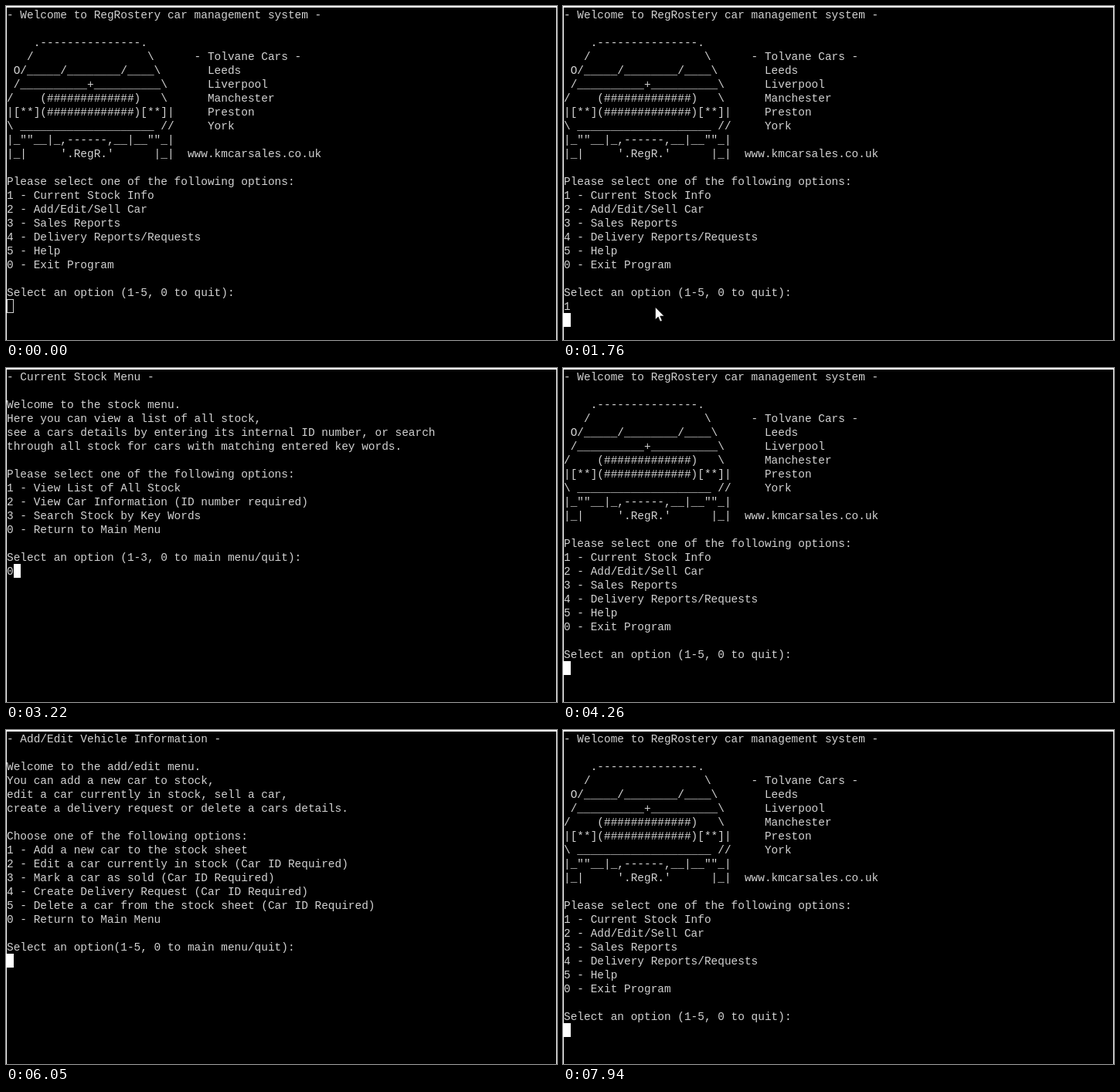
Write an HTML page that moves like this. It is 713x433 px and loops after 8 s.

```html
<!DOCTYPE html>
<html lang="en">
<head>
<meta charset="utf-8">
<title>Car stock terminal</title>
<style>
html, body { margin: 0; width: 100%; height: 100%; overflow: hidden; background: #fff; }
#term {
  position: absolute; left: 1px; top: 2px; width: 711px; height: 431px;
  overflow: hidden; background: #000; color: #d2d2d2;
  font: 14.44px/18px "Liberation Mono", "Courier New", monospace;
  font-variant-ligatures: none;
}
pre { position: absolute; left: 0; top: 1px; margin: 0; font: inherit; }
.screen, .key { visibility: hidden; animation: 8s step-end infinite; }
.key { position: absolute; left: 0; }
#main { animation-name: main; }
#stock { animation-name: stock; }
#edit { animation-name: edit; }
#main .a { animation-name: key-1; }
#main .b { animation-name: key-2; }
#stock .key { animation-name: key-stock; }
#edit .key { animation-name: key-edit; }
@keyframes main {
  0%, 43.625%, 92% { visibility: visible; }
  23.25%, 70% { visibility: hidden; }
}
@keyframes stock {
  0%, 43.625% { visibility: hidden; }
  23.25% { visibility: visible; }
}
@keyframes edit {
  0%, 92% { visibility: hidden; }
  70% { visibility: visible; }
}
@keyframes key-1 {
  0%, 23.25% { visibility: hidden; }
  18.125% { visibility: visible; }
}
@keyframes key-2 {
  0%, 70% { visibility: hidden; }
  62.5% { visibility: visible; }
}
@keyframes key-stock {
  0%, 43.625% { visibility: hidden; }
  37.5% { visibility: visible; }
}
@keyframes key-edit {
  0%, 92% { visibility: hidden; }
  82.5% { visibility: visible; }
}
#cursor {
  position: absolute; left: 0; top: 378px; width: 9px; height: 18px;
  box-sizing: border-box; border: 1px solid #fff; background: #fff;
  animation: cursor 8s step-end infinite, focus 8s step-end infinite;
}
@keyframes focus {
  0% { background: #000; border-color: #d2d2d2; }
  12.75%, 100% { background: #fff; border-color: #fff; }
}
@keyframes cursor {
  0% { left: 0; top: 378px; }
  18.125% { left: 1ch; top: 378px; }
  22% { left: 0; top: 396px; }
  23.25% { left: 0; top: 252px; }
  37.5% { left: 1ch; top: 252px; }
  43.625% { left: 0; top: 378px; }
  62.5% { left: 1ch; top: 378px; }
  68.625% { left: 0; top: 396px; }
  70% { left: 0; top: 288px; }
  82.5% { left: 1ch; top: 288px; }
  92%, 100% { left: 0; top: 378px; }
}
#mouse {
  position: absolute; left: 118px; top: 388px; width: 13px; height: 21px;
  animation: mouse 8s linear infinite;
}
@keyframes mouse {
  0%, 3% { transform: translate(26px, 50px); animation-timing-function: ease-out; }
  10.375%, 25.5% { transform: none; animation-timing-function: ease-in; }
  30%, 100% { transform: translate(26px, 50px); }
}
</style>
</head>
<body>
<div id="term">
<pre class="screen" id="main">
- Welcome to RegRostery car management system -

    .---------------.
   /                 \      - Tolvane Cars -
 O/_____/________/____\       Leeds
 /__________+__________\      Liverpool
/    (#############)   \      Manchester
|[**](#############)[**]|     Preston
\ ____________________ //     York
|_""__|_,------,__|__""_|
|_|     '.RegR.'      |_|  www.kmcarsales.co.uk

Please select one of the following options:
1 - Current Stock Info
2 - Add/Edit/Sell Car
3 - Sales Reports
4 - Delivery Reports/Requests
5 - Help
0 - Exit Program

Select an option (1-5, 0 to quit):
<span class="key a">1</span><span class="key b">2</span></pre>
<pre class="screen" id="stock">
- Current Stock Menu -

Welcome to the stock menu.
Here you can view a list of all stock,
see a cars details by entering its internal ID number, or search
through all stock for cars with matching entered key words.

Please select one of the following options:
1 - View List of All Stock
2 - View Car Information (ID number required)
3 - Search Stock by Key Words
0 - Return to Main Menu

Select an option (1-3, 0 to main menu/quit):
<span class="key">0</span></pre>
<pre class="screen" id="edit">
- Add/Edit Vehicle Information -

Welcome to the add/edit menu.
You can add a new car to stock,
edit a car currently in stock, sell a car,
create a delivery request or delete a cars details.

Choose one of the following options:
1 - Add a new car to the stock sheet
2 - Edit a car currently in stock (Car ID Required)
3 - Mark a car as sold (Car ID Required)
4 - Create Delivery Request (Car ID Required)
5 - Delete a car from the stock sheet (Car ID Required)
0 - Return to Main Menu

Select an option(1-5, 0 to main menu/quit):
<span class="key">0</span></pre>
<div id="cursor"></div>
<svg id="mouse" viewBox="0 0 13 21"><path d="M.5 .5V16.5L4.2 13L6.8 19L9.3 18L6.7 12H11.8Z" fill="#fff" stroke="#000" stroke-width=".6"/></svg>
</div>
</body>
</html>
```
